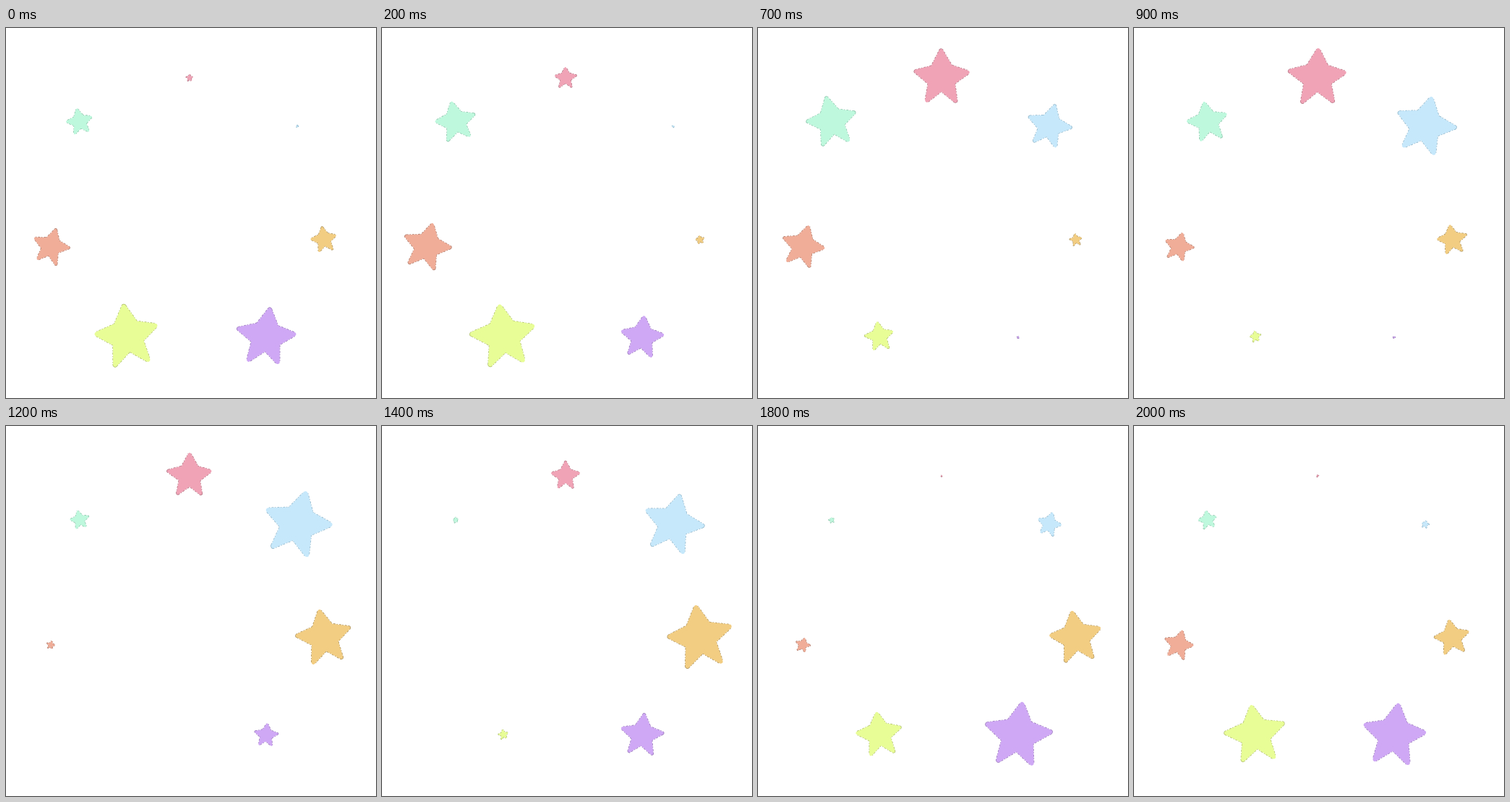
An HTML page with a canvas for the animation above (2.1 s loop, 512 by 512 pixels).

```html
<!DOCTYPE html>
<html lang="en">
<head>
<meta charset="utf-8">
<title>Ring of stars</title>
<style>
html, body { margin: 0; width: 100%; height: 100%; overflow: hidden; background: #fff; }
canvas { display: block; width: 100vmin; height: 100vmin; }
</style>
</head>
<body>
<canvas width="512" height="512"></canvas>
<script>
const ctx = document.querySelector('canvas').getContext('2d');
const STEP = 100, STEPS = 21, TAU = Math.PI * 2;

// peak: the step at which a star reaches its full size; turn: tilt in degrees
const stars = [
  { x: 254, y: 69, turn: 0, peak: 8.4, size: 42, hue: 345, sat: 72, light: 79 },
  { x: 403, y: 136, turn: 14, peak: 11.5, size: 49, hue: 201, sat: 87, light: 88 },
  { x: 440, y: 293, turn: -9, peak: 14.8, size: 47, hue: 40, sat: 81, light: 73 },
  { x: 360, y: 428, turn: 6, peak: 18.5, size: 48, hue: 270, sat: 79, light: 81 },
  { x: 168, y: 427, turn: -8, peak: 22.1, size: 47, hue: 72, sat: 96, light: 79 },
  { x: 62, y: 303, turn: 15, peak: 25, size: 37, hue: 14, sat: 75, light: 77 },
  { x: 102, y: 130, turn: -11, peak: 26.5, size: 38, hue: 152, sat: 81, light: 86 }
];

// Repeatable value from -1 to 1
function noise(seed) {
  const v = Math.sin(seed * 12.9898) * 43758.5453;
  return (v - Math.floor(v)) * 2 - 1;
}

function sizeAt(star, step) {
  const swell = (1 + Math.cos(TAU * (step - star.peak) / STEPS)) / 2;
  return star.size * swell ** .9;
}

// Arms droop towards the legs, and the notch between the legs is the deepest.
function starPath(star, r, border, seed) {
  const path = new Path2D();
  for (let k = 0; k < 10; k++) {
    const a = k * TAU / 10;
    const angle = a - TAU / 4 + .1 * Math.sin(a) + star.turn * TAU / 360
      + .03 * noise(seed + k);
    const reach = k % 2 ? r * (.44 + .05 * Math.cos(a)) : r * .98 - border / 2;
    const d = reach * (1 + .025 * noise(seed + k + 20));
    path.lineTo(star.x + d * Math.cos(angle), star.y + d * Math.sin(angle));
  }
  path.closePath();
  return path;
}

function drawStar(star, index, step) {
  const r = sizeAt(star, step);
  if (r < 1) return;
  const border = r * .13;
  const path = starPath(star, r, border, index * 97 + step * 41 + 1);

  // Broken, darker rim
  ctx.setLineDash([3, 1.5, 1.5, 2]);
  ctx.lineDashOffset = step * 3;
  ctx.lineWidth = border + 1.4;
  ctx.strokeStyle = `hsl(${star.hue} ${star.sat * .4}% ${star.light - 21}%)`;
  ctx.stroke(path);

  ctx.setLineDash([]);
  ctx.lineWidth = border;
  ctx.strokeStyle = ctx.fillStyle = `hsl(${star.hue} ${star.sat}% ${star.light}%)`;
  ctx.fill(path);
  ctx.stroke(path);
}

const start = performance.now();
function draw() {
  const step = Math.floor((performance.now() - start) / STEP) % STEPS;
  ctx.clearRect(0, 0, 512, 512);
  stars.forEach((star, i) => drawStar(star, i, step));
  requestAnimationFrame(draw);
}

ctx.lineJoin = 'round';
draw();
</script>
</body>
</html>
```
